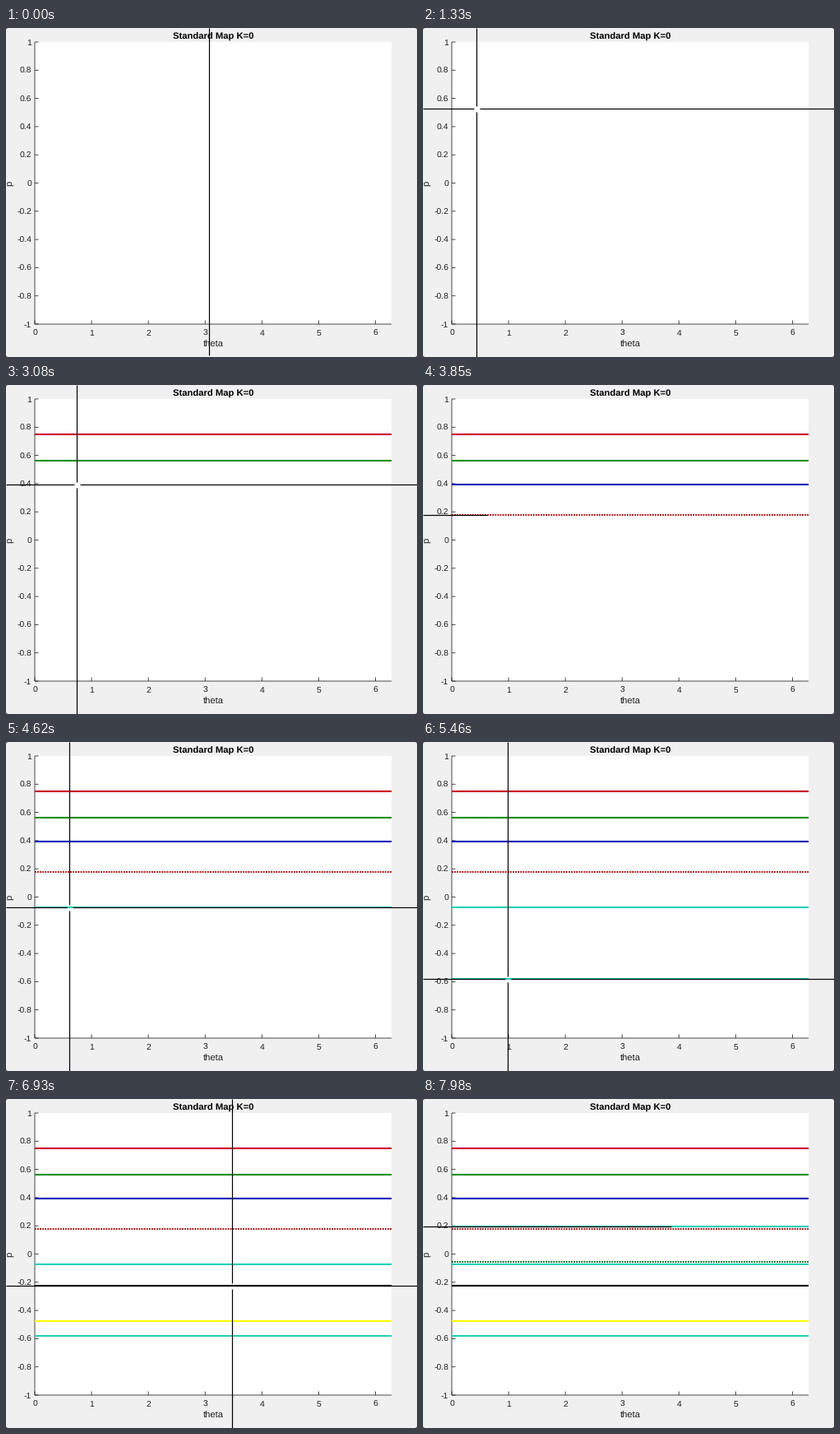
Write a matplotlib script that moves like this. It is 500 by 400 pixels and loops after 8 s.

```python
import math
import numpy as np
import matplotlib
import matplotlib.pyplot as plt
from matplotlib.animation import FuncAnimation
from matplotlib.patches import Polygon, Rectangle

W, H = 500, 400
LOOP, INTERVAL, STEP = 8000, 20, 70
LEFT, RIGHT, TOP, BOTTOM = 35, 469, 17, 360
PX = 0.72  # points per pixel at 100 dpi
INK = "#202020"
TURQUOISE = "#22d0b8"
GAP = 3.5

FIRST_CLICK, CLICK_EVERY = 1760, 690
TRAVEL, PAUSE = 280, 60  # pointer move, then rest before the click
ENTRY, HOVER = np.array([247, 401]), np.array([65, 98])

# clicked point and look of its orbit, in click order
SEEDS = [
    (0.62, 0.752, "#cc0022", "-"),
    (0.71, 0.565, "#109010", "-"),
    (0.74, 0.396, "#1010b8", "-"),
    (0.67, 0.175, "#b01010", ":"),
    (0.61, -0.071, TURQUOISE, "-"),
    (0.985, -0.578, TURQUOISE, "-"),
    (1.70, -0.478, "#ffff00", "-"),
    (3.475, -0.222, "#0a0008", "-"),
    (3.70, -0.058, "#0c6a20", ":"),
    (3.91, 0.198, TURQUOISE, "-"),
]

matplotlib.rcParams["font.family"] = "Liberation Sans"
matplotlib.rcParams["text.hinting"] = "none"
fig = plt.figure(figsize=(W / 100, H / 100), dpi=100, facecolor="#f0f0f0")
ax = fig.add_axes([0, 0, 1, 1])
ax.set_xlim(0, W)
ax.set_ylim(H, 0)
ax.axis("off")


def px_x(theta):
    return LEFT + theta * (RIGHT - LEFT) / (2 * math.pi)


def px_y(p):
    return (TOP + BOTTOM) / 2 - p * (BOTTOM - TOP) / 2


def line(xs, ys, color, width, **kw):
    return ax.plot(xs, ys, color=color, lw=width * PX,
                   solid_capstyle="butt", dash_capstyle="butt", **kw)[0]


def rule(xs, ys):
    line(xs, ys, INK, 0.8, snap=False)


def text(x, y, label, size, **kw):
    style = dict(ha="center", va="baseline", color=INK) | kw
    ax.text(x, y, label, fontsize=size * PX, **style)


def draw_axes():
    ax.add_patch(Rectangle((LEFT, TOP), RIGHT - LEFT, BOTTOM - TOP,
                           fc="white", ec="none", zorder=0))
    rule([LEFT, LEFT], [TOP, BOTTOM])
    rule([LEFT, RIGHT], [BOTTOM, BOTTOM])
    for n in range(7):
        x = px_x(n)
        rule([x, x], [BOTTOM - 4.5, BOTTOM])
        text(x, 374, str(n), 10.4)
    for n in range(-5, 6):
        y = px_y(n / 5)
        rule([LEFT, LEFT + 4.5], [y, y])
        text(31, y + 4, f"{n / 5:g}", 10.4, ha="right")
    text(252.3, 13.6, "Standard Map K=0", 11.2, weight="bold", color="black")
    text(252, 388.2, "theta", 11.3)
    text(5, px_y(0), "p", 11.3, rotation=90, va="center")
    for x, sx in ((0, 2), (W, -2)):
        for y, sy in ((0, 2), (H, -2)):
            ax.add_patch(Polygon([(x, y), (x + sx, y), (x, y + sy)],
                                 fc="#707070", ec="none"))


def click_time(k):
    return FIRST_CLICK + CLICK_EVERY * k


def pointer_stops():
    """Arrival times and places: three bursts in, then one per click."""
    stops = [(490 * b - 140, ENTRY + (HOVER - ENTRY) * b / 3)
             for b in (1, 2, 3)]
    for k, (theta, p, *_) in enumerate(SEEDS):
        place = np.array([px_x(theta), px_y(p)])
        stops.append((click_time(k) - PAUSE, place))
    return stops


def ease(s):
    s = min(max(s, 0), 1)
    return s * s * (3 - 2 * s)


def pointer(t):
    pos = ENTRY
    for arrival, place in STOPS:
        pos = pos + (place - pos) * ease((t - arrival) / TRAVEL + 1)
    return np.floor(pos + 0.5)


def split(end, centre):
    """Span from 0 to end with a hole around centre."""
    return [0, centre - GAP, np.nan, centre + GAP, max(end, centre + GAP)]


draw_axes()
orbits = []
for theta, p, color, style in SEEDS:
    dash = (0, (0.85, 0.62)) if style == ":" else style
    orbits.append(line([LEFT, RIGHT], [px_y(p)] * 2, color, 2.1,
                       ls=dash, zorder=4))
v_hair = line([], [], "black", 1.2, zorder=5)
h_hair = line([], [], "black", 1.2, zorder=5)
STOPS = pointer_stops()


def update(i):
    t = (i * INTERVAL + INTERVAL // 2) // STEP * STEP
    redrawing = False
    for k, orbit in enumerate(orbits):
        age = t - click_time(k)
        orbit.set_visible(age >= 0)
        redrawing |= 0 <= age < STEP
    x, y = pointer(t)
    # a click redraws the plot and leaves only the left arm of the cross
    v_hair.set_data([x] * 5, split(H, y))
    v_hair.set_visible(not redrawing)
    h_hair.set_data(split(x if redrawing else W, x), [y] * 5)
    return [*orbits, v_hair, h_hair]


anim = FuncAnimation(fig, update, frames=LOOP // INTERVAL, interval=INTERVAL,
                     repeat=True, repeat_delay=0, blit=False)
plt.show()
```
